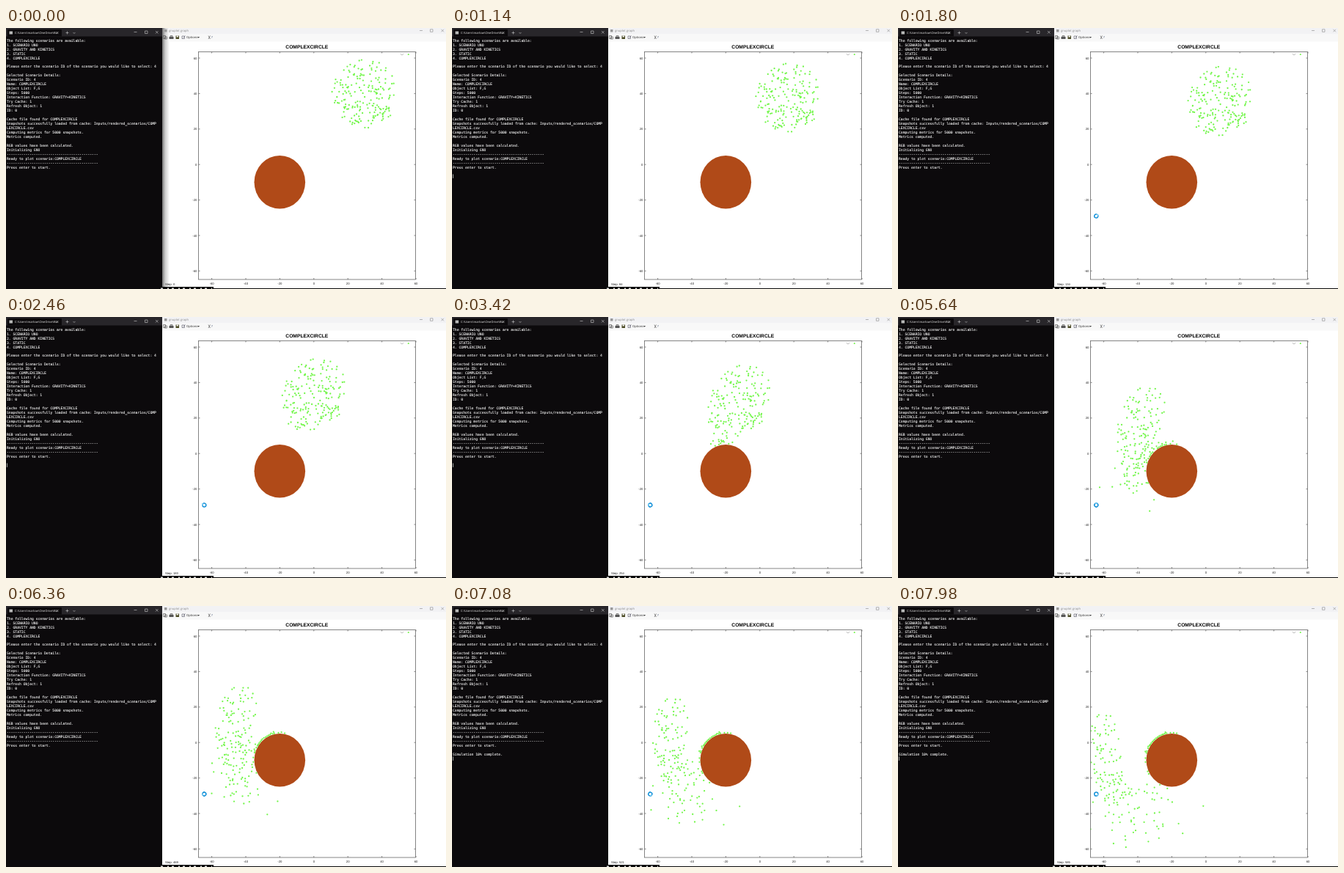
These frames come from a looping animation (600 by 356 pixels, 8000 ms). An HTML page:

```html
<!DOCTYPE html>
<html lang="en">
<head>
<meta charset="utf-8">
<title>Scenario plot</title>
<style>
  html, body { margin: 0; width: 100%; height: 100%; overflow: hidden; background: #fff; }
  svg { display: block; width: 100vw; height: 100vh; }
  text { text-rendering: geometricPrecision; white-space: pre; }
  .term { font: 4.71px "DejaVu Sans Mono", monospace; fill: #f4f4f4; stroke: #f4f4f4; stroke-width: .1; }
  .ui { font: 4.1px "Open Sans", sans-serif; }
  .plot { font: 4.2px "Liberation Sans", Arial, sans-serif; fill: #222; }
  .title { font: bold 6.7px "Liberation Sans", Arial, sans-serif; fill: #000; }
  .line { fill: none; stroke-width: .6; }
  .axis { fill: none; stroke: #666; stroke-width: .8; }
</style>
</head>
<body>
<svg viewBox="0 0 600 356" preserveAspectRatio="none">
  <clipPath id="area"><rect x="262.5" y="32.5" width="296" height="310.5"/></clipPath>
  <linearGradient id="fade">
    <stop stop-color="#777"/>
    <stop offset=".4" stop-color="#ccc"/>
    <stop offset="1" stop-color="#fff"/>
  </linearGradient>

  <g id="terminal">
    <rect width="213" height="356" fill="#0c0a0c"/>
    <rect width="213" height="11.5" fill="#28262a"/>
    <path d="M2 11.5V3q0-1 1-1H75q1 0 1 1v8.5z" fill="#0c0a0c"/>
    <rect x="4.5" y="4.5" width="4.5" height="4" fill="#b8b8b8"/>
    <text class="ui" x="12" y="8" fill="#eee">C:\Users\marlow\OneDrive\Bu</text>
    <path class="line" stroke="#ccc" d="M68.5 5l3 3m0-3l-3 3M81.5 6.500h4m-2-2v4M91.5 6l1.5 1.5 1.5-1.5M174.5 5.5h4M189.5 4h3.5v3.5h-3.5zM204 4l3.5 3.5m0-3.5l-3.5 3.5"/>
  </g>

  <g id="window">
    <rect x="213" width="387" height="8.5" fill="#f2f2f4"/>
    <rect x="213" y="8.5" width="387" height="10" fill="#f8f8f8"/>
    <rect id="shadow" x="213" y="0" width="10" height="353" fill="url(#fade)"/>
    <rect x="216" y="2" width="3.5" height="3.5" fill="#999"/>
    <text class="ui" x="222" y="5.3" fill="#888">gnuplot graph</text>
    <path class="line" stroke="#888" d="M564 3.5h4M578.5 1.8h3.5v3.5h-3.5zM593.5 1.8l3.5 3.5m0-3.5l-3.5 3.5"/>
    <path class="line" stroke="#444" d="M214.5 10.5h3v4h-3zM216.5 12h3v3h-3zM224 10.5h3v1.5h-3zM276 10.5l2.5 4.5m0-4.5l-2.5 4.5"/>
    <path d="M222.5 12h6v3h-6z" fill="#555"/>
    <path d="M231.5 10.5h4.5v4.5h-4.5z" fill="#4b4a24"/>
    <path d="M232.5 10.5h2.5v2h-2.5z" fill="#eee"/>
    <path class="line" stroke="#556" d="M240 11h3.5v3.5h-3.5zM241.5 13.5l3-3"/>
    <text class="ui" x="246" y="14.4" fill="#222">Options</text>
    <path d="M261 12h3l-1.5 1.8z" fill="#333"/>
    <text class="ui" x="280" y="14.4" fill="#235">?</text>
    <path d="M209.5 353H283v2H600v1H209.5z" fill="#0a0a0a"/>
    <path d="M211 355.2H281" stroke="#ddd" stroke-width="1.6" stroke-dasharray="3 6 2 4"/>
  </g>

  <text class="title" x="410.3" y="27.5" text-anchor="middle">COMPLEXCIRCLE</text>
  <g id="axes"></g>
  <ellipse cx="373.3" cy="210.3" rx="34.8" ry="36.3" fill="#b04a18"/>
  <path id="dots" clip-path="url(#area)" fill="none" stroke="#74f64c" stroke-width="2.3" stroke-linecap="round"/>
  <path class="line" stroke="#999" d="M538.3 34.8q0 2 1.7 2t1.7-2"/>
  <circle cx="548.8" cy="36" r="1.1" fill="#74f64c"/>
  <rect x="262.5" y="32.5" width="296" height="310.5" class="axis"/>
  <text id="step" class="plot" x="217" y="351.3"></text>
  <g id="busy" fill="none" stroke-width="1.5">
    <circle r="2.5" stroke="#1290d8" fill="#fff"/>
    <circle r="2.5" stroke="#7fd0f5" stroke-dasharray="3 12.7"/>
  </g>
  <rect id="caret" x="1" width=".7" height="5.4" fill="#ddd"/>
</svg>
<script>
const LOOP = 8000, TICK = 60, LAST_STEP = 590;
const $ = id => document.getElementById(id);
const px = x => 419.8 + 2.32 * x;
const py = y => 186.2 - 2.42 * y;
const rowY = row => 18.7 + 5.966 * row;

function add(parent, tag, attrs, text = '') {
  const node = document.createElementNS('http://www.w3.org/2000/svg', tag);
  for (const name in attrs) node.setAttribute(name, attrs[name]);
  node.textContent = text;
  return parent.appendChild(node);
}

const rule = '-'.repeat(44);
const output = `The following scenarios are available:
1. SCENARIO UNO
2. GRAVITY AND KINETICS
3. STATIC
4. COMPLEXCIRCLE

Please enter the scenario ID of the scenario you would like to select: 4

Selected Scenario Details:
Scenario ID: 4
Name: COMPLEXCIRCLE
Object List: F,G
Steps: 5000
Interaction Function: GRAVITY+KINETICS
Try Cache: 1
Refresh Object: 1
ID: 0

Cache file found for COMPLEXCIRCLE
Snapshots successfully loaded from cache: Inputs/rendered_scenarios/COMP
LEXCIRCLE.csv
Computing metrics for 5000 snapshots.
Metrics computed.

RGB values have been calculated.
Initializing GNU
${rule}
Ready to plot scenario:COMPLEXCIRCLE
${rule}
Press enter to start.`;
const printRow = (text, row) =>
  add($('terminal'), 'text', { class: 'term', x: 1, y: rowY(row) }, text);
output.split('\n').forEach(printRow);
const progress = printRow('Simulation 10% complete.', 31);

for (let v = -60; v <= 60; v += 20) {
  const x = px(v), y = py(v), axes = $('axes');
  add(axes, 'text', { class: 'plot', x: 260.3, y: y + 1.5, 'text-anchor': 'end' }, v);
  add(axes, 'text', { class: 'plot', x, y: 349.5, 'text-anchor': 'middle' }, v);
  add(axes, 'path', { class: 'axis',
    d: `M262.5 ${y}h2M558.5 ${y}h-2M${x} 343v-2M${x} 32.5v2` });
}

function seeded(seed) {
  return () => {
    seed = (seed + 0x6D2B79F5) | 0;
    let n = Math.imul(seed ^ (seed >>> 15), 1 | seed);
    n = (n + Math.imul(n ^ (n >>> 7), 61 | n)) ^ n;
    return ((n ^ (n >>> 14)) >>> 0) / 4294967296;
  };
}

// A drifting disc of particles falls towards a heavy body at (-20, -10).
const random = seeded(42);
const particles = Array.from({ length: 190 }, () => {
  const r = 19.5 * Math.sqrt(random()), a = 2 * Math.PI * random();
  return { x: 30 + r * Math.cos(a), y: 40 + r * Math.sin(a), vx: -.15, vy: -.021 };
});

function fall(p) {
  const GM = .8, SURFACE = 15.5, BOUNCE = .6, SLIDE = .3;
  let dx = p.x + 20, dy = p.y + 10, r = Math.hypot(dx, dy);
  p.vx -= GM * dx / r ** 3;
  p.vy -= GM * dy / r ** 3;
  p.x += p.vx;
  p.y += p.vy;
  dx = p.x + 20; dy = p.y + 10; r = Math.hypot(dx, dy);
  if (r >= SURFACE) return;
  const nx = dx / r, ny = dy / r;
  const normal = Math.abs(p.vx * nx + p.vy * ny) * BOUNCE;
  const tangent = (p.vy * nx - p.vx * ny) * SLIDE;
  p.vx = normal * nx - tangent * ny;
  p.vy = normal * ny + tangent * nx;
  p.x = -20 + SURFACE * nx;
  p.y = -10 + SURFACE * ny;
}

// Equal masses exchange momentum along the line between their centres.
function collide(a, b) {
  const DIAMETER = 1, RESTITUTION = .8;
  const dx = b.x - a.x, dy = b.y - a.y, d2 = dx * dx + dy * dy;
  if (d2 > DIAMETER ** 2) return;
  const closing = (b.vx - a.vx) * dx + (b.vy - a.vy) * dy;
  if (closing >= 0) return;
  const k = (1 + RESTITUTION) / 2 * closing / d2;
  a.vx += k * dx; a.vy += k * dy;
  b.vx -= k * dx; b.vy -= k * dy;
}

function advance() {
  particles.forEach(fall);
  particles.forEach((a, i) => {
    for (let j = i + 1; j < particles.length; j++) collide(a, particles[j]);
  });
}

const snapshots = [];
for (let i = 0; i <= LAST_STEP; i++) {
  snapshots.push(particles.map(p => `M${px(p.x).toFixed(1)} ${py(p.y).toFixed(1)}h0`).join(''));
  advance();
}

const pace = [[0, 0], [1140, 84], [2460, 183], [4320, 321], [5640, 416], [7080, 521], [7980, 585]];
function stepAt(t) {
  const i = Math.max(1, pace.findIndex(([time]) => time >= t));
  const [t0, s0] = pace[i - 1], [t1, s1] = pace[i];
  return Math.round(s0 + (s1 - s0) * (t - t0) / (t1 - t0));
}

const show = (node, on) => node.setAttribute('visibility', on ? 'visible' : 'hidden');

function draw(now) {
  const t = Math.floor((now % LOOP) / TICK) * TICK;
  const step = stepAt(t), reported = step >= 500;
  $('dots').setAttribute('d', snapshots[step]);
  $('step').textContent = 'Step: ' + step;
  show($('shadow'), step === 0);
  show(progress, reported);

  const blink = t - (reported ? 6600 : 940);
  show($('caret'), blink >= 0 && blink % 1200 < 600);
  $('caret').setAttribute('y', rowY(reported ? 32 : 31) - 4.2);

  show($('busy'), t >= 1740);
  $('busy').setAttribute('transform', `translate(270.3 256.5) rotate(${t * .36})`);
}

const start = performance.now();
function loop() {
  draw(performance.now() - start);
  requestAnimationFrame(loop);
}
loop();
</script>
</body>
</html>
```
